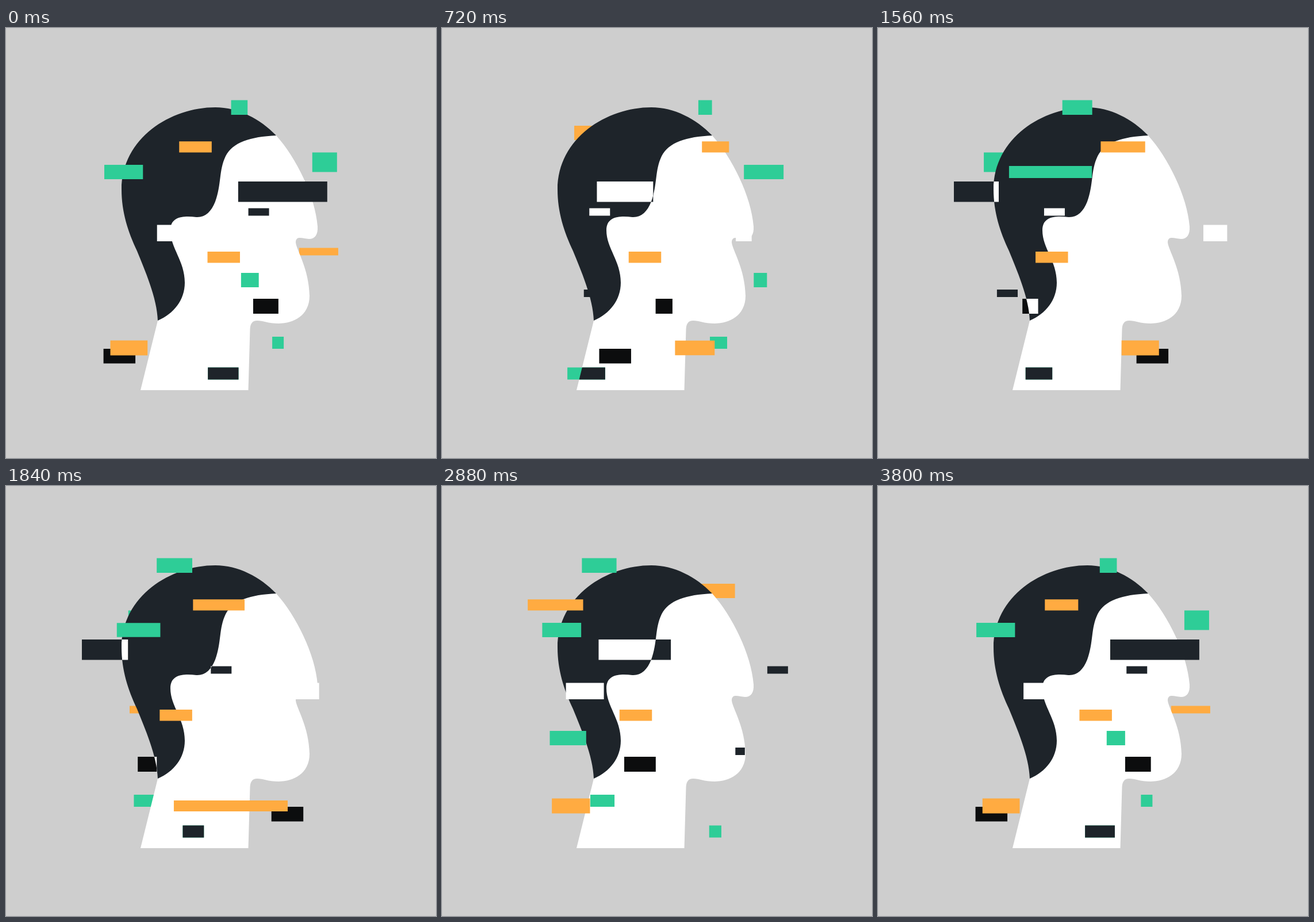
Write an HTML page with a canvas that moves like this. It is 748 px wide and 748 px high and loops after 3.84 s.

```html
<!DOCTYPE html>
<html lang="en">
<head>
<meta charset="utf-8">
<title>Glitch head</title>
<style>
  html, body { margin: 0; width: 100%; height: 100%; overflow: hidden; background: #cecece; }
  canvas { display: block; width: 748px; height: 748px; }
</style>
</head>
<body>
<canvas id="stage" width="748" height="748"></canvas>
<script>
const ctx = document.getElementById('stage').getContext('2d');
const LOOP = 3840, STEP = 40, TRAIL = 120;
const BG = '#cecece', DARK = '#1e242a', BLACK = '#0c0d0e';
const WHITE = '#ffffff', GREEN = '#2ecd97', ORANGE = '#ffab41';

const hair = new Path2D(`M264 509 C263 470 241 420 228 388 C212 354 201 320 201 281
  C201 191 287 138 364 138 C404 138 442 158 470 187
  C425 189 394 199 382 223 C370 248 375 272 364 302 C357 320 346 330 331 329
  C312 327 286 326 286 352 C286 383 311 405 311 443 C311 473 292 497 264 509 Z`);

// The closing edge runs inside the hair so no white fringe shows.
const face = new Path2D(`M470 187 C505 226 538 293 542 345 C543 360 537 367 527 367
  C518 367 504 360 504 373 C505 386 527 418 528 466 C528 500 500 514 474 514
  C456 514 447 509 437 509 C428 509 425 515 424.5 524 L421.5 630 H234 L264 509
  L268 480 L275 300 L400 165 Z`);

const wrap = t => ((t % LOOP) + LOOP) % LOOP;
const mix = (a, b, u) => a + (b - a) * u;
const sine = u => (1 - Math.cos(Math.PI * u)) / 2;

// Sways between a (reached at ta) and b (reached at tb, kept for hold ms).
function swing(ta, a, tb, b, hold = 0) {
  const out = wrap(tb - ta), back = LOOP - out - hold;
  return t => {
    const s = wrap(t - ta);
    if (s < out) return mix(a, b, sine(s / out));
    return mix(b, a, sine(Math.max(0, s - out - hold) / back));
  };
}

// Darts from a to b, then back at the turn, each time with a long slow tail.
function dart(a, b, turn, softness) {
  const rush = u => u * (1 + softness) / (u + softness);
  return time => {
    const t = wrap(time);
    return t < turn ? mix(a, b, rush(t / turn)) : mix(b, a, rush((t - turn) / (LOOP - turn)));
  };
}

const bars = [];

function bar(y, h, color, x, width, look = {}) {
  const w = typeof width === 'number' ? () => width : width;
  bars.push({ rect: t => [x(t), y, w(t), h], color, ...look });
}

// A darting bar is stretched between its present and slightly earlier place.
function streak(y, h, color, w, x) {
  const rect = t => {
    const now = x(t), before = x(t - TRAIL), stretch = Math.abs(now - before);
    const inset = stretch * 0.026;
    return [Math.min(now, before), y + inset, w + stretch, h - 2 * inset];
  };
  bars.push({ rect, color });
}

const overHair = { clip: hair, clipColor: WHITE };
const overFace = { clip: face, clipColor: DARK };
const behind = (from = 0, to = LOOP) => ({ hides: t => wrap(t - from) < to - from });

bar(125.5, 25.5, GREEN, swing(700, 446, 2350, 211), swing(500, 22, 2300, 69));
bar(170, 25, ORANGE, swing(720, 230, 2760, 448), 64, behind());
bar(197.3, 19.2, ORANGE, swing(900, 460, 2960, 148), swing(550, 46, 2450, 103));
bar(216.5, 34, GREEN, swing(1320, 176, 3820, 533), 43, behind());
streak(238, 25, GREEN, 67, dart(171, 532, 1380, 0.015));
bar(267, 35.5, DARK, swing(3820, 404, 1470, 132, 430), swing(3820, 155, 1100, 78, 500), overHair);
bar(313.5, 13, DARK, swing(1050, 233, 2950, 567), 36, overHair);
bar(342.5, 28.5, WHITE, swing(1230, 600, 2950, 214, 520), swing(900, 26, 2450, 66, 900));
bar(382.5, 13, ORANGE, swing(3820, 510, 1840, 215), 68, behind());
bar(389, 19.5, ORANGE, swing(0, 350.5, 1920, 267), 56.5);
bar(426, 25, GREEN, swing(850, 546, 2650, 176), swing(520, 22, 2600, 66), behind(700, 2800));
bar(455, 13, DARK, swing(1220, 183, 3260, 540), swing(1200, 39.5, 2650, 16), behind(3260, LOOP + 1220));
bar(471, 26, BLACK, swing(3820, 430, 2050, 224), swing(1250, 25, 2950, 55), overHair);
bar(537, 21, GREEN, swing(380, 490, 2250, 188), swing(0, 20, 2100, 58), behind(700, 2400));
bar(558, 25.5, BLACK, swing(3820, 169.5, 1800, 462), 55.5, behind(2000, 3760));
bar(590.5, 21, GREEN, swing(970, 206, 3000, 467), swing(620, 66, 2700, 20), overFace);
streak(543.5, 26, ORANGE, 64, dart(181.5, 426, 1720, 0.052));

function fill(color, shape) {
  ctx.fillStyle = color;
  ctx.fill(shape);
}

function drawBar({ rect, color, clip, clipColor }, t) {
  const shape = new Path2D();
  shape.rect(...rect(t));
  fill(color, shape);
  if (!clip) return;
  ctx.save();
  ctx.clip(clip);
  fill(clipColor, shape);
  ctx.restore();
}

function draw(now) {
  const t = Math.floor(wrap(now) / STEP) * STEP;
  const hidden = b => Boolean(b.hides && b.hides(t));
  ctx.fillStyle = BG;
  ctx.fillRect(0, 0, 748, 748);
  bars.filter(hidden).forEach(b => drawBar(b, t));
  fill(WHITE, face);
  fill(DARK, hair);
  bars.filter(b => !hidden(b)).forEach(b => drawBar(b, t));
}

const start = performance.now();
function tick() {
  draw(performance.now() - start);
  requestAnimationFrame(tick);
}
tick();
</script>
</body>
</html>
```
